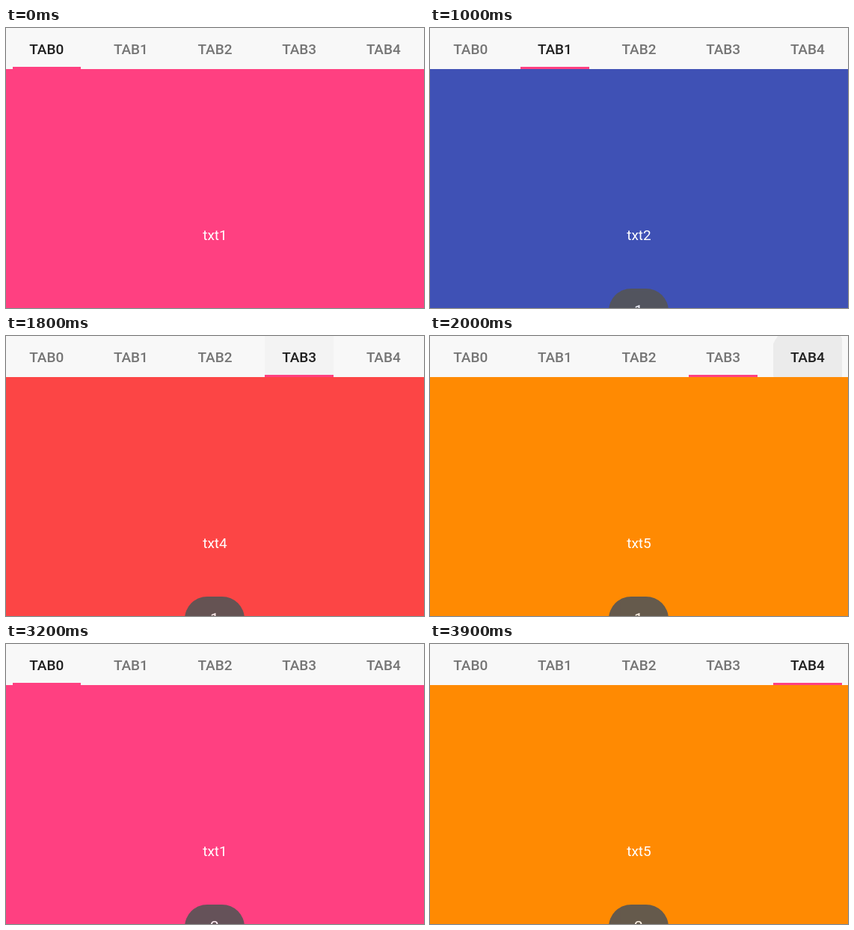
Write an HTML page that moves like this. It is 559 px wide and 375 px high and loops after 4400 ms.

```html
<!DOCTYPE html>
<html lang="en">
<head>
<meta charset="utf-8">
<title>Tabs</title>
<style>
  html, body { margin: 0; width: 100%; height: 100%; overflow: hidden; }
  body { position: relative; font: 19px Roboto, sans-serif; text-align: center; background: #f8f8f8; }
  div { position: absolute; }
  .tab { top: 0; width: 91.5px; height: 55px; font-weight: 500; line-height: 57px; }
  #ripple { top: 0; width: 91.5px; height: 55px; background: #000; }
  #indicator { top: 52px; height: 3px; background: #ff4081; }
  #page { top: 55px; left: 0; width: 559px; height: 320px; color: #fff; line-height: 445px; overflow: hidden; }
  #toast { left: 239px; top: 349px; width: 80px; height: 60px; border-radius: 30px; background: #555;
           color: #fff; font-size: 21px; line-height: 60px; }
</style>
</head>
<body>
<div id="ripple"></div>
<div id="indicator"></div>
<div id="page"></div>
<div id="toast"></div>
<script>
const LOOP = 4400, STEP = 100, SLIDE = 200, FADE = 250;
const TAB_WIDTH = 91.5, GROW_OFFSET = 37;
const colors = ['#ff4081', '#3f51b5', '#aa66cc', '#fc4545', '#ff8a02'];
const taps = [
  { at: -1000, tab: 0, ripple: 0 },
  { at: 600, tab: 1, ripple: 300 },
  { at: 1100, tab: 2, ripple: 300 },
  { at: 1600, tab: 3, ripple: 400 },
  { at: 2000, tab: 4, ripple: 300 },
  { at: 2700, tab: 0, ripple: 300 },
  { at: 3600, tab: 4, ripple: 300 }
];
const toasts = [
  { label: '1', from: 700, to: 2500 },
  { label: '2', from: 2750, to: LOOP }
];

const [ripple, indicator, page, toast] =
  ['ripple', 'indicator', 'page', 'toast'].map(id => document.getElementById(id));
const tabLeft = i => 8.5 + 112.65 * i;
const clamp = x => Math.min(1, Math.max(0, x));
const mix = (a, b, p) => a + (b - a) * p;

const tabs = colors.map((_, i) => {
  const tab = document.createElement('div');
  tab.className = 'tab';
  tab.textContent = 'TAB' + i;
  tab.style.left = tabLeft(i) + 'px';
  document.body.append(tab);
  return tab;
});

// cubic-bezier(.4, 0, .2, 1), solved by bisection
function ease(x) {
  let lo = 0, hi = 1;
  for (let i = 0; i < 20; i++) {
    const u = (lo + hi) / 2, v = 1 - u;
    if (1.2 * v * v * u + 0.6 * v * u * u + u ** 3 < x) lo = u; else hi = u;
  }
  return lo * lo * (3 - 2 * lo);
}

// Neighbours slide; distant tabs grow from just beside the new tab
function placeIndicator(from, to, p) {
  const left = tabLeft(to), right = left + TAB_WIDTH;
  let startLeft = tabLeft(from), startRight = startLeft + TAB_WIDTH;
  if (Math.abs(to - from) > 1)
    startLeft = startRight = to > from ? left - GROW_OFFSET : right + GROW_OFFSET;
  const x = mix(startLeft, left, p);
  indicator.style.left = x + 'px';
  indicator.style.width = mix(startRight, right, p) - x + 'px';
}

function placeRipple(tap, age) {
  const fresh = age < STEP;
  ripple.style.left = tabLeft(tap.tab) + 'px';
  ripple.style.opacity = age >= tap.ripple ? 0 : fresh ? 0.05 : 0.02;
  ripple.style.clipPath = fresh ? 'circle(52.7px at 48px 32px)' : 'none';
}

function showToast(t) {
  const current = toasts.findLast(item => t >= item.from);
  toast.textContent = current ? current.label : '';
  const fadeIn = current ? 1 - (1 - clamp((t - current.from) / FADE)) ** 2 : 0;
  const fadeOut = current ? 1 - clamp((t - current.to) / FADE) ** 2 : 0;
  toast.style.opacity = 0.9 * fadeIn * fadeOut;
}

function draw() {
  const t = Math.floor(performance.now() % LOOP / STEP) * STEP;
  const n = taps.findLastIndex(tap => t >= tap.at);
  const tap = taps[n], age = t - tap.at;
  tabs.forEach((tab, i) => tab.style.color = i === tap.tab ? '#1f1f1f' : '#757575');
  page.textContent = 'txt' + (tap.tab + 1);
  page.style.background = colors[tap.tab];
  placeIndicator(taps[Math.max(0, n - 1)].tab, tap.tab, ease(clamp(age / SLIDE)));
  placeRipple(tap, age);
  showToast(t);
  requestAnimationFrame(draw);
}
draw();
</script>
</body>
</html>
```
